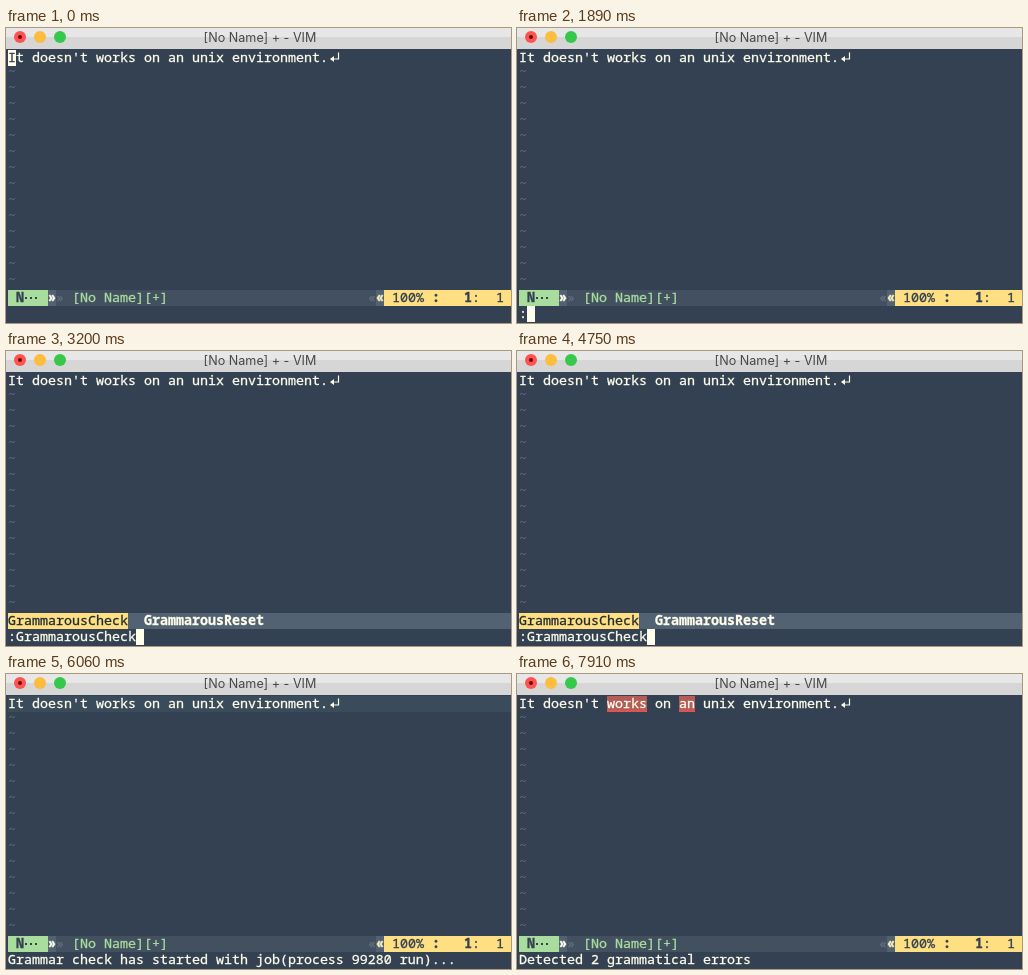
These frames come from a looping animation (505x295 px, 8000 ms). An HTML page:

```html
<!DOCTYPE html>
<html lang="en">
<head>
<meta charset="utf-8">
<title>Grammar check in Vim</title>
<style>
  :root {
    --bg: #334152; --line: #3a4b5c; --bar: #435060; --strong: #536273;
    --fg: #fffeeb; --dim: #607080; --gold: #fedf81; --green: #a9dd9d;
  }
  html, body { margin: 0; width: 100%; height: 100%; overflow: hidden; background: var(--bg); }

  .window { position: absolute; inset: 0; overflow: hidden; }
  .title {
    position: absolute; left: 0; right: 0; top: 0; height: 21px;
    background: linear-gradient(#e7e7e7 9px, #d6d6d6 9px);
    font: 12.6px/19px Inter, sans-serif; color: #484848;
    text-align: center; text-indent: 3px;
  }
  .title svg { position: absolute; left: 0; top: 0; }

  /* Character grid: 8 x 16 px cells, --c column, --r row */
  .term {
    position: absolute; left: 2px; top: 22px; right: 0; height: 272px;
    font: 500 13.3333px/14px "Noto Sans Mono", monospace; color: var(--fg);
    font-variant-ligatures: none; -webkit-text-stroke: .3px;
  }
  .term span, .term div {
    position: absolute; white-space: pre; height: 16px;
    left: calc(var(--c, 0) * 8px); top: calc(var(--r, 0) * 16px);
  }
  .term div span { --r: 0; }
  .term .full { right: 0; }
  .term .tildes { color: var(--dim); line-height: 16px; top: 13px; height: auto; -webkit-text-stroke: 0; }
  .eol { position: absolute; left: 320px; top: 0; }

  .status { --r: 15; background: var(--bar); }
  .status .mode { width: 40px; background: var(--green); color: var(--bg); font-weight: 700; }
  .mode i {
    position: absolute; left: 17px; top: 7px; width: 12px; height: 2px;
    background: repeating-linear-gradient(90deg, currentColor 0 2px, transparent 2px 5px);
  }
  .sep { background: var(--strong); font-weight: 700; }
  .faint { color: var(--dim); }
  .status .name { color: var(--green); }
  .status .pos { right: 0; background: var(--gold); color: var(--bg); }
  .menu { --r: 15; background: var(--strong); }
  .menu .pick { background: var(--gold); color: #222b35; }

  .cursor { background: var(--fg); color: var(--bg); width: 8px; }
  .error { background: #b55c59; }
  .error svg { position: absolute; left: 0; bottom: 0; width: 100%; height: 3px; }

  .cmd { width: 0; }
  .cmd .text { width: 100%; overflow: hidden; }
  .term .cmd .cursor { left: 100%; }

  .cmd, .cmd .cursor, .at-start, .at-error, .cursorline, .menu, .started, .found {
    animation: 8s step-end infinite;
  }
  .cmd { animation-name: type; }
  .cmd .cursor { animation-name: cmd-blink; }
  .at-start { animation-name: start-blink; }
  .at-error { animation-name: error-blink; }
  .cursorline { background: var(--line); animation-name: line-held; }
  .menu { animation-name: menu-open; }
  .started { animation-name: job-started; }
  .found { animation-name: job-done; }

  @keyframes start-blink {
    0%, 4.375%, 12.625%, 20.75%, 60.875%, 79.5% { opacity: 1; }
    1.5%, 9.625%, 17%, 23.625%, 75.75%, 90.625%, 100% { opacity: 0; }
  }
  @keyframes error-blink {
    0%, 98.875%, 100% { opacity: 0; }
    93.625% { opacity: 1; }
  }
  @keyframes cmd-blink {
    0%, 48.25%, 56.375%, 60.875%, 100% { opacity: 0; }
    23.625%, 51.875%, 59.375% { opacity: 1; }
  }
  @keyframes type {
    0%, 60.875%, 100% { width: 0; }
    23.625% { width: 8px; }
    28.875% { width: 16px; }
    31.875% { width: 24px; }
    33.375% { width: 32px; }
    35.5% { width: 40px; }
    36.25% { width: 48px; }
    40% { width: 128px; }
  }
  @keyframes menu-open   { 0%, 60.875%, 100% { opacity: 0; } 40% { opacity: 1; } }
  @keyframes job-started { 0%, 81.75%, 100% { opacity: 0; } 60.875% { opacity: 1; } }
  @keyframes line-held   { 0%, 90.625%, 100% { opacity: 0; } 60.875% { opacity: 1; } }
  @keyframes job-done    { 0%, 100% { opacity: 0; } 90.625% { opacity: 1; } }
</style>
</head>
<body>
<div class="window">
  <div class="title">[No Name] + - VIM
    <svg width="64" height="20">
      <circle cx="14" cy="9" r="6" fill="#fc5450"/>
      <circle cx="14" cy="9" r="2" fill="#6e0a08"/>
      <circle cx="34" cy="9" r="6" fill="#fdbd3e"/>
      <circle cx="54" cy="9" r="6" fill="#35c84a"/>
    </svg>
  </div>

  <div class="term">
    <div class="full cursorline"></div>
    <span>It doesn't works on an unix environment.</span>
    <svg class="eol" width="16" height="16" fill="none" stroke="#fffeeb" stroke-width="1.2">
      <path d="M10.5 2.5V9H4"/>
      <path d="M6 6L2 9L6 12Z" fill="#fffeeb" stroke="none"/>
    </svg>
    <span class="tildes">~
~
~
~
~
~
~
~
~
~
~
~
~
~</span>

    <div class="found">
      <span class="error" style="--c:11">works<svg><use href="#wave"/></svg></span>
      <span class="error" style="--c:20">an<svg><use href="#wave"/></svg></span>
    </div>
    <span class="cursor at-start">I</span>
    <span class="cursor at-error" style="--c:11">w</span>

    <div class="full status">
      <span class="mode"> N<i></i></span>
      <span class="sep" style="--c:5">»</span>
      <span class="faint" style="--c:6">»</span>
      <span class="name" style="--c:8">[No Name][+]</span>
      <span class="faint" style="--c:45">«</span>
      <span class="sep" style="--c:46;color:#fff0b8">«</span>
      <span class="pos" style="--c:47"> 100% <b>:   1</b>:  1</span>
    </div>
    <div class="full menu">
      <span class="pick">GrammarousCheck</span>
      <span style="--c:17;font-weight:700">GrammarousReset</span>
    </div>

    <div class="cmd" style="--r:16">
      <span class="text">:GrammarousCheck</span>
      <span class="cursor"></span>
    </div>
    <span class="started" style="--r:16">Grammar check has started with job(process 99280 run)...</span>
    <span class="found" style="--r:16">Detected 2 grammatical errors</span>
  </div>

  <svg width="0" height="0" style="position:absolute">
    <path id="wave" d="M0 2q1-2 2 0t2 0t2 0t2 0t2 0t2 0t2 0t2 0t2 0t2 0t2 0t2 0t2 0t2 0t2 0t2 0t2 0t2 0t2 0t2 0" fill="none" stroke="#ff4f4f"/>
  </svg>
</div>
</body>
</html>
```
